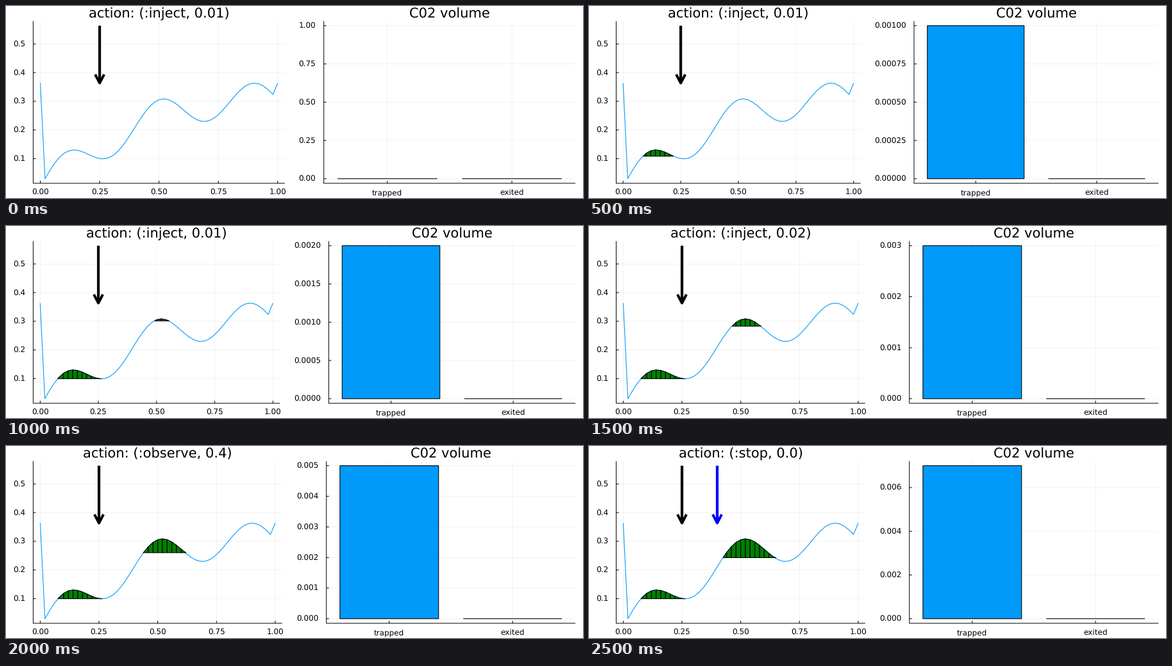
These frames come from a looping animation (900 px wide and 300 px high, 3 s). A matplotlib script:

```python
import numpy as np
import matplotlib.pyplot as plt
from matplotlib.animation import FuncAnimation

plt.rcParams.update({"font.family": "DejaVu Sans", "text.hinting": "none",
                     "text.hinting_factor": 1, "path.snap": False})

PX = 0.72                      # points per pixel at 100 dpi
BLUE, GREEN = "#009AFA", "#008000"
LEFT, RIGHT, TOP, BOTTOM = 42.4, 888.2, 23.6, 277
PAD = (BOTTOM - TOP) * 0.03 / 1.06

# Height of the rock surface, walled in at both ends
GRID = np.linspace(0, 1, 51)
SURFACE = (0.0593 * np.sin(5 * np.pi * GRID) + 0.0932 * np.sin(np.pi * GRID)
           + 0.306 * GRID)
LOW, PEAK = SURFACE[1], SURFACE.max()
SURFACE[[0, -1]] = PEAK
ARROW_TOP = PEAK + 0.2

# Trapped gas: (left end, right end, level)
FULL = (0.0758, 0.264, 0.1)
# title, plot width, top of volume axis, tick step, decimals, trapped, lobes, arrows
WELL, PROBE = (0.25, "black"), (0.4, "blue")
STEPS = [
    ("(:inject, 0.01)", 392.5, 1, 0.25, 2, 0, [], [WELL]),
    ("(:inject, 0.01)", 381.2, 0.001, 0.00025, 5, 0.001,
     [(0.0876, 0.2185, 0.1086)], [WELL]),
    ("(:inject, 0.01)", 384.8, 0.002, 0.0005, 4, 0.002,
     [FULL, (0.4925, 0.554, 0.3015)], [WELL]),
    ("(:inject, 0.02)", 388.5, 0.003, 0.001, 3, 0.003,
     [FULL, (0.4635, 0.587, 0.283)], [WELL]),
    ("(:observe, 0.4)", 388.5, 0.005, 0.001, 3, 0.005,
     [FULL, (0.4385, 0.621, 0.2603)], [WELL]),
    ("(:stop, 0.0)", 388.5, 0.007, 0.002, 3, 0.007,
     [FULL, (0.425, 0.65, 0.243)], [WELL, PROBE]),
]

fig = plt.figure(figsize=(9, 3), dpi=100, facecolor="white")
ax = fig.add_axes([0, 0, 1, 1])


def line(x, y, color="black", width=1.0, **kw):
    kw.setdefault("solid_capstyle", "butt")
    ax.plot(x, y, color=color, lw=width * PX, **kw)


def label(x, y, text, size=11.94, ha="center"):
    ax.text(x, y, text, fontsize=size * PX, ha=ha, va="baseline")


def scale_y(v, low, high):
    return BOTTOM - PAD - (v - low) / (high - low) * (BOTTOM - TOP - 2 * PAD)


def frame(left, width, title, xticks, yticks):
    """Grid, axes, ticks and labels; ticks are (pixel, text) pairs."""
    right = left + width
    for x, text in xticks:
        line([x, x], [TOP, BOTTOM], width=0.5, alpha=0.1, zorder=0)
        line([x, x], [BOTTOM, BOTTOM - 4], zorder=5)
        label(x, 295.3, text)
    for y, text in yticks:
        line([left, right], [y, y], width=0.5, alpha=0.1, zorder=0)
        line([left, left + 4], [y, y], zorder=5)
        label(left - 12.5, y + 4.3, text, ha="right")
    line([left, left, right], [TOP, BOTTOM, BOTTOM], zorder=5)
    label(left + width / 2, 18.4, title, 20.7)


def draw_surface(title, width, lobes, arrows):
    unit = width / 1.06

    def sx(x):
        return LEFT + (np.asarray(x) + 0.03) * unit

    def sy(v):
        return scale_y(np.asarray(v), LOW, ARROW_TOP)

    frame(LEFT, width, "action: " + title,
          [(sx(t), f"{t:.2f}") for t in np.arange(5) / 4],
          [(sy(t), f"{t:.1f}") for t in np.arange(1, 6) / 10])
    line(sx(GRID), sy(SURFACE), BLUE, 1.1, zorder=2)

    for a, b, level in lobes:
        inside = (GRID > a) & (GRID < b)
        xs = np.r_[a, GRID[inside], b]
        tops = np.r_[level, np.maximum(SURFACE[inside], level), level]
        for i in range(len(xs) - 1):
            x0, x1 = xs[i:i + 2]
            ax.fill(sx([x0, x0, x1, x1]), sy([level, tops[i], tops[i + 1], level]),
                    facecolor=GREEN, edgecolor="black", lw=1.1 * PX,
                    joinstyle="round", zorder=3)

    for x, color in arrows:
        px, tip = sx(x), sy(PEAK)
        line([px, px], [sy(ARROW_TOP), tip], color, 4.2, zorder=4)
        line([px - 7, px, px + 7], [tip - 13.5, tip, tip - 13.5], color, 4,
             solid_joinstyle="round", zorder=4)


def draw_volume(width, top, step, decimals, trapped):
    left, unit = RIGHT - width, width / 2.02
    middle = left + width / 2
    centers = middle - unit / 2, middle + unit / 2
    ticks = np.arange(int(top / step + 1e-6) + 1) * step
    frame(left, width, "C02 volume", list(zip(centers, ["trapped", "exited"])),
          [(scale_y(t, 0, top), f"{t:.{decimals}f}") for t in ticks])
    for x, value in zip(centers, (trapped, 0)):
        x0, x1 = x - 0.4 * unit, x + 0.4 * unit
        y0, y1 = scale_y(0, 0, top), scale_y(value, 0, top)
        if value:
            ax.fill([x0, x0, x1, x1], [y0, y1, y1, y0], facecolor=BLUE,
                    edgecolor="black", lw=1.1 * PX, zorder=3)
        else:
            line([x0, x1], [y0, y0], width=1.1, zorder=3)


def draw(i):
    title, width, top, step, decimals, trapped, lobes, arrows = STEPS[i]
    ax.clear()
    ax.set(xlim=(0, 900), ylim=(300, 0))
    ax.axis("off")
    draw_surface(title, width, lobes, arrows)
    draw_volume(width, top, step, decimals, trapped)
    return []


anim = FuncAnimation(fig, draw, frames=len(STEPS), interval=500,
                     repeat=True, repeat_delay=0)
plt.show()
```
